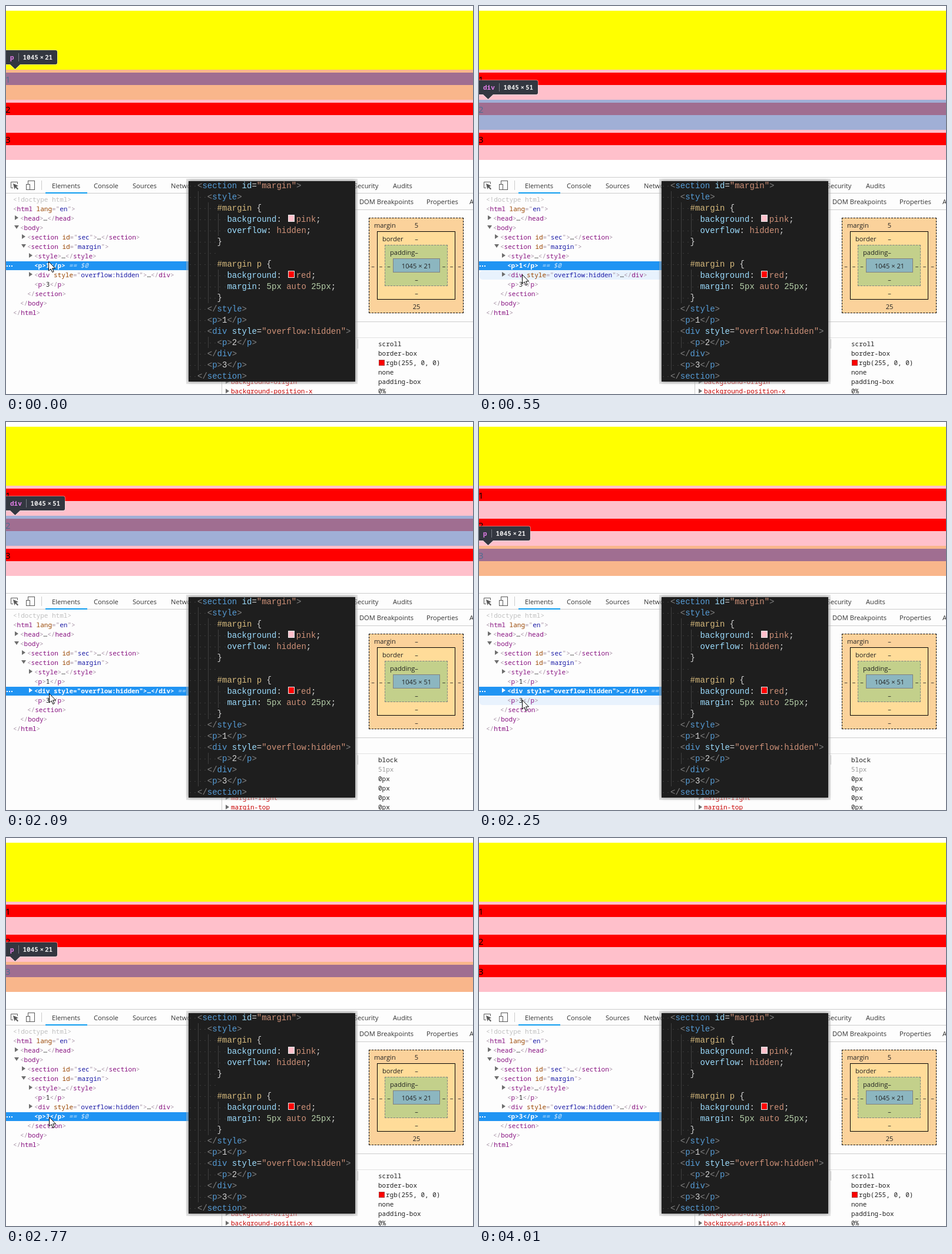
An HTML page with a canvas that plays this animation: 793x658 px, repeating every 5130 ms.

```html
<!DOCTYPE html>
<html lang="en">
<head>
<meta charset="utf-8">
<title>Margins and overflow</title>
<style>
html, body { margin: 0; width: 100%; height: 100%; overflow: hidden; background: #fff; }
canvas { display: block; }
</style>
</head>
<body>
<canvas id="stage" width="793" height="658"></canvas>
<script>
const ctx = document.getElementById('stage').getContext('2d');
const LOOP = 5130;
const UI = '11.15px "Open Sans", sans-serif';
const MONO = '11px "Noto Sans Mono", monospace';
const CODE = '14px "Liberation Mono", "Courier New", monospace';
const LINE = '#cccccc';

const TREE_COLORS = { punct: '#a894a6', tag: '#881280', attr: '#994500', eq: '#a894a6', quote: '#a894a6', value: '#1a1aa6', text: '#222' };
const CODE_COLORS = { punct: '#808080', tag: '#569cd6', attr: '#9cdcfe', eq: '#d4d4d4', quote: '#ce9178', value: '#ce9178', text: '#d4d4d4' };

const SEL = '#d7ba7d', PROP = '#9cdcfe', VAL = '#ce9178', NUM = '#b5cea8', FG = '#d4d4d4';

// x, row, markup, arrow (r = closed, d = open)
const TREE = [
  [12, 1, '<html lang="en">'],
  [24, 2, '<head>…</head>', 'r'],
  [24, 3, '<body>', 'd'],
  [36, 4, '<section id="sec">…</section>', 'r'],
  [36, 5, '<section id="margin">', 'd'],
  [48, 6, '<style>…</style>', 'r'],
  [48, 7, '<p>1</p>'],
  [48, 8, '<div style="overflow:hidden">…</div>', 'r'],
  [48, 9, '<p>3</p>'],
  [36, 10, '</section>'],
  [24, 11, '</body>'],
  [12, 12, '</html>']
];

// indent, then markup or coloured runs
const SNIPPET = [
  [0, '<section id="margin">'],
  [2, '<style>'],
  [4, [['#margin ', SEL], ['{', FG]]],
  [6, [['background', PROP], [': ', FG], ['pink', VAL, '#ffc0cb'], [';', FG]]],
  [6, [['overflow', PROP], [': ', FG], ['hidden', VAL], [';', FG]]],
  [4, [['}', FG]]],
  [4, []],
  [4, [['#margin p ', SEL], ['{', FG]]],
  [6, [['background', PROP], [': ', FG], ['red', VAL, '#f00'], [';', FG]]],
  [6, [['margin', PROP], [': ', FG], ['5px ', NUM], ['auto ', VAL], ['25px', NUM], [';', FG]]],
  [4, [['}', FG]]],
  [2, '</style>'],
  [2, '<p>1</p>'],
  [2, '<div style="overflow:hidden">'],
  [4, '<p>2</p>'],
  [2, '</div>'],
  [2, '<p>3</p>'],
  [0, '</section>']
];

const PANELS = {
  p: {
    top: '5', bottom: '25', size: '1045 × 21',
    values: ['scroll', 'border-box', 'rgb(255, 0, 0)', 'none', 'padding-box', '0%'],
    names: ['background-origin', 'background-position-x']
  },
  div: {
    top: '–', bottom: '–', size: '1045 × 51',
    values: ['block', '51px', '0px', '0px', '0px', '0px'],
    names: ['margin-right', 'margin-top']
  }
};

// time, x, y
const POINTER = [
  [0, 72, 433], [400, 73, 444], [550, 73, 455], [2090, 73, 460],
  [2250, 73, 471], [2400, 73, 473], [3890, -2, 474], [4010, -50, 474]
];

function rect(x, y, w, h, color) {
  ctx.fillStyle = color;
  ctx.fillRect(x, y, w, h);
}

function frame(x, y, w, h, color) {
  ctx.strokeStyle = color;
  ctx.lineWidth = 1;
  ctx.strokeRect(x + .5, y + .5, w - 1, h - 1);
}

// Each side starts and ends with a full dash, as CSS borders do.
function dashedFrame(x, y, w, h, color) {
  const side = (x1, y1, x2, y2) => {
    const length = x2 - x1 + y2 - y1, count = Math.round((length + 2) / 5);
    ctx.setLineDash([3, (length - 3 * count) / (count - 1)]);
    ctx.beginPath();
    ctx.moveTo(x1, y1);
    ctx.lineTo(x2, y2);
    ctx.stroke();
  };
  ctx.strokeStyle = color;
  ctx.lineWidth = 1;
  for (const edge of [y + .5, y + h - .5]) side(x, edge, x + w, edge);
  for (const edge of [x + .5, x + w - .5]) side(edge, y, edge, y + h);
  ctx.setLineDash([]);
}

function poly(points, color) {
  ctx.beginPath();
  points.forEach(([x, y]) => ctx.lineTo(x, y));
  ctx.closePath();
  ctx.fillStyle = color;
  ctx.fill();
}

function text(str, x, y, color, font, align = 'left') {
  ctx.font = font;
  ctx.textAlign = align;
  ctx.fillStyle = color;
  ctx.fillText(str, x, y);
  return x + ctx.measureText(str).width;
}

function markup(str, x, y, colors, font) {
  let inTag = false, inValue = false, named = false;
  for (const tok of str.match(/<\/?|[>="]|\s+|[^<>="\s]+/g)) {
    let kind = 'text';
    if (tok[0] === '<') { inTag = true; named = false; kind = 'punct'; }
    else if (tok === '>') { inTag = false; kind = 'punct'; }
    else if (tok === '=') kind = 'eq';
    else if (tok === '"') { inValue = !inValue; kind = 'quote'; }
    else if (inValue) kind = 'value';
    else if (inTag) { kind = named ? 'attr' : 'tag'; named = true; }
    x = text(tok, x, y, colors[kind], font);
  }
  return x;
}

function arrow(x, y, open, color) {
  poly(open ? [[x - 1, y - 3], [x + 7, y - 3], [x + 3, y + 3]]
            : [[x, y - 4], [x + 6, y], [x, y + 4]], color);
}

function drawPage(over) {
  rect(0, 0, 793, 290, '#fff');
  rect(0, 8, 793, 100, '#ff0');
  rect(0, 108, 793, 153, '#ffc0cb');
  for (let i = 0; i < 3; i++) {
    const y = 113 + 51 * i;
    rect(0, y, 793, 21, '#f00');
    text(i + 1, -1, y + 17, '#000', '15px "Open Sans", sans-serif');
  }
  if (over < 0) return;
  const y = 108 + 51 * over, content = 'rgba(111,168,220,.66)', margin = 'rgba(246,178,107,.66)';
  if (over === 1) rect(0, y, 793, 51, content);
  else {
    rect(0, y, 793, 5, margin);
    rect(0, y + 5, 793, 21, content);
    rect(0, y + 26, 793, 25, margin);
  }
  drawTip(y - 33, over === 1 ? 'div' : 'p', over === 1 ? 51 : 21);
}

function drawTip(y, tag, height) {
  const bold = 'bold ' + MONO, shift = tag === 'div' ? 13 : 0;
  const right = 87 + shift, bottom = y + 24;
  ctx.beginPath();
  ctx.moveTo(-4, y);
  ctx.arcTo(right, y, right, bottom, 3);
  ctx.arcTo(right, bottom, 0, bottom, 3);
  ctx.lineTo(24, bottom);
  ctx.lineTo(15.5, bottom + 8);
  ctx.lineTo(7, bottom);
  ctx.lineTo(-4, bottom);
  ctx.closePath();
  ctx.strokeStyle = 'rgba(255,255,255,.4)';
  ctx.lineWidth = 2;
  ctx.stroke();
  ctx.fillStyle = '#333740';
  ctx.fill();
  text(tag, 7, y + 16, '#e47eea', bold);
  rect(21 + shift, y + 5, 1, 14, '#777b84');
  text('1045', 28.5 + shift, y + 16, '#e8e8e8', bold);
  text('×', 57.5 + shift, y + 16, '#e8e8e8', bold);
  text(height, 66 + shift, y + 16, '#e8e8e8', bold);
}

function drawToolbar() {
  rect(0, 290, 793, 368, '#fdfdfd');
  rect(0, 290, 793, 1, LINE);
  rect(0, 317, 793, 1, LINE);
  rect(67, 316, 71, 2, '#0d9cf0');
  rect(60, 296, 1, 16, LINE);

  ctx.strokeStyle = '#5a5a5a';
  ctx.lineWidth = 1;
  ctx.beginPath();
  ctx.moveTo(12, 308.5);
  ctx.lineTo(8.5, 308.5);
  ctx.lineTo(8.5, 298.5);
  ctx.lineTo(19.5, 298.5);
  ctx.lineTo(19.5, 302);
  ctx.stroke();
  poly([[12, 301], [21, 305], [17.5, 306.2], [21, 310], [19.5, 311.5], [16, 307.8], [14.5, 311]], '#5a5a5a');
  frame(37, 296, 12, 16, '#5a5a5a');
  rect(34, 302, 7, 10, '#fdfdfd');
  frame(34, 302, 7, 10, '#5a5a5a');

  const tabs = [['Elements', 78], ['Console', 149], ['Sources', 215], ['Network', 280], ['Security', 591], ['Audits', 657]];
  tabs.forEach(([name, x]) => text(name, x, 309, '#333', UI));
  [['DOM Breakpoints', 600], ['Properties', 714], ['Accessibility', 787]]
    .forEach(([name, x]) => text(name, x, 336, '#333', UI));
  rect(367, 345, 426, 1, LINE);
}

function drawTree(sel, over) {
  text('<!doctype html>', 12, 332, '#c0c0c0', MONO);
  for (const [x, row, str, toggle] of TREE) {
    const y = 328 + 16 * row, node = row - 7, picked = node === sel;
    if (picked) {
      rect(0, y - 7, 310, 15, '#2094f3');
      for (let i = 0; i < 3; i++) rect(1 + 4 * i, y, 2, 2, '#fff');
      const end = text(str, x, y + 4, '#fff', 'bold ' + MONO);
      text('== $0', end + 6, y + 4, 'rgba(255,255,255,.75)', 'italic ' + MONO);
    } else {
      if (over >= 0 && node === over) {
        ctx.beginPath();
        ctx.roundRect(1, y - 7, 320, 15, 5);
        ctx.fillStyle = '#e8f2fd';
        ctx.fill();
      }
      markup(str, x, y + 4, TREE_COLORS, MONO);
    }
    if (toggle) arrow(x - 9, y - 1, toggle === 'd', picked ? '#fff' : '#6e6e6e');
  }
}

function drawSidebar({ top, bottom, size, values, names }) {
  rect(366, 318, 1, 340, LINE);
  rect(616, 359, 161, 162, '#fbd29b');
  dashedFrame(616, 359, 161, 162, '#000');
  rect(630, 382, 133, 116, '#ffdc99');
  frame(630, 382, 133, 116, '#000');
  rect(643, 405, 107, 70, '#c3d08b');
  dashedFrame(643, 405, 107, 70, '#808080');
  rect(657, 428, 80, 24, '#8cb6c0');
  frame(657, 428, 80, 24, '#808080');

  const label = (str, x, y, align) => text(str, x, y, '#222', UI, align);
  label('margin', 625, 376);
  label('border', 639, 399);
  label('padding', 652, 422);
  label(top, 697, 376, 'center');
  label(bottom, 697, 514, 'center');
  label(size, 697, 445, 'center');
  [399, 422, 468, 491].forEach(y => label('–', 697, y, 'center'));
  [623, 636.5, 650, 743.5, 756.5, 770].forEach(x => label('–', x, 445, 'center'));

  rect(367, 535, 426, 1, LINE);
  rect(367, 562, 426, 1, '#e2e2e2');
  rect(597, 565, 1, 16, LINE);
  values.forEach((value, i) => {
    const y = 573 + 16 * i, swatch = value.startsWith('rgb');
    if (swatch) {
      rect(633, y - 5, 10, 10, '#f00');
      frame(633, y - 5, 10, 10, '#a33');
    }
    text(value, swatch ? 645 : 632, y + 4, value === '51px' ? '#999' : '#222', MONO);
  });
  names.forEach((name, i) => {
    const y = 637 + 16 * i;
    arrow(373, y, false, '#6e6e6e');
    text(name, 382, y + 4, '#c80000', MONO);
  });
}

function drawSnippet() {
  rect(306, 293, 291, 348, 'rgba(200,200,200,.45)');
  ctx.save();
  ctx.shadowColor = 'rgba(0,0,0,.4)';
  ctx.shadowBlur = 6;
  rect(310, 297, 283, 340, '#1e1e1e');
  ctx.restore();
  SNIPPET.forEach(([indent, line], i) => {
    const y = 305 + 19 * i;
    for (let c = -2; c < indent; c++) rect(312 + Math.round((c + 2) * 8.4), y, 2, 1, '#393939');
    for (let c = 0; c < indent; c += 2) rect(326 + Math.round(c * 8.4), y - 10, 1, 19, '#404040');
    let x = 325 + indent * 8.4;
    if (typeof line === 'string') return markup(line, x, y + 4, CODE_COLORS, CODE);
    for (const [str, color, swatch] of line) {
      if (swatch) {
        rect(479, y - 8, 11, 12, '#eee');
        rect(480, y - 7, 9, 10, swatch);
        x += 16.5;
      }
      x = text(str, x, y + 4, color, CODE);
    }
  });
}

function drawPointer(x, y) {
  ctx.save();
  ctx.translate(x + .5, y + .5);
  poly([[0, 0], [0, 15.5], [3.6, 12.3], [6.2, 18], [8.6, 17], [6.1, 11.4], [11, 11.4]], '#fff');
  ctx.strokeStyle = '#000';
  ctx.lineWidth = 1;
  ctx.stroke();
  ctx.restore();
}

function draw(t) {
  const over = t < 550 ? 0 : t < 2250 ? 1 : t < 4010 ? 2 : -1;
  const sel = t < 1100 ? 0 : t < 2650 ? 1 : 2;
  const panel = t >= 1100 && t < 2770 ? PANELS.div : PANELS.p;
  const [, x, y] = POINTER.filter(step => step[0] <= t).pop();
  drawPage(over);
  drawToolbar();
  drawTree(sel, over);
  drawSidebar(panel);
  drawSnippet();
  drawPointer(x, y);
}

const start = performance.now();
function tick() {
  draw((performance.now() - start) % LOOP);
  requestAnimationFrame(tick);
}
tick();
</script>
</body>
</html>
```
